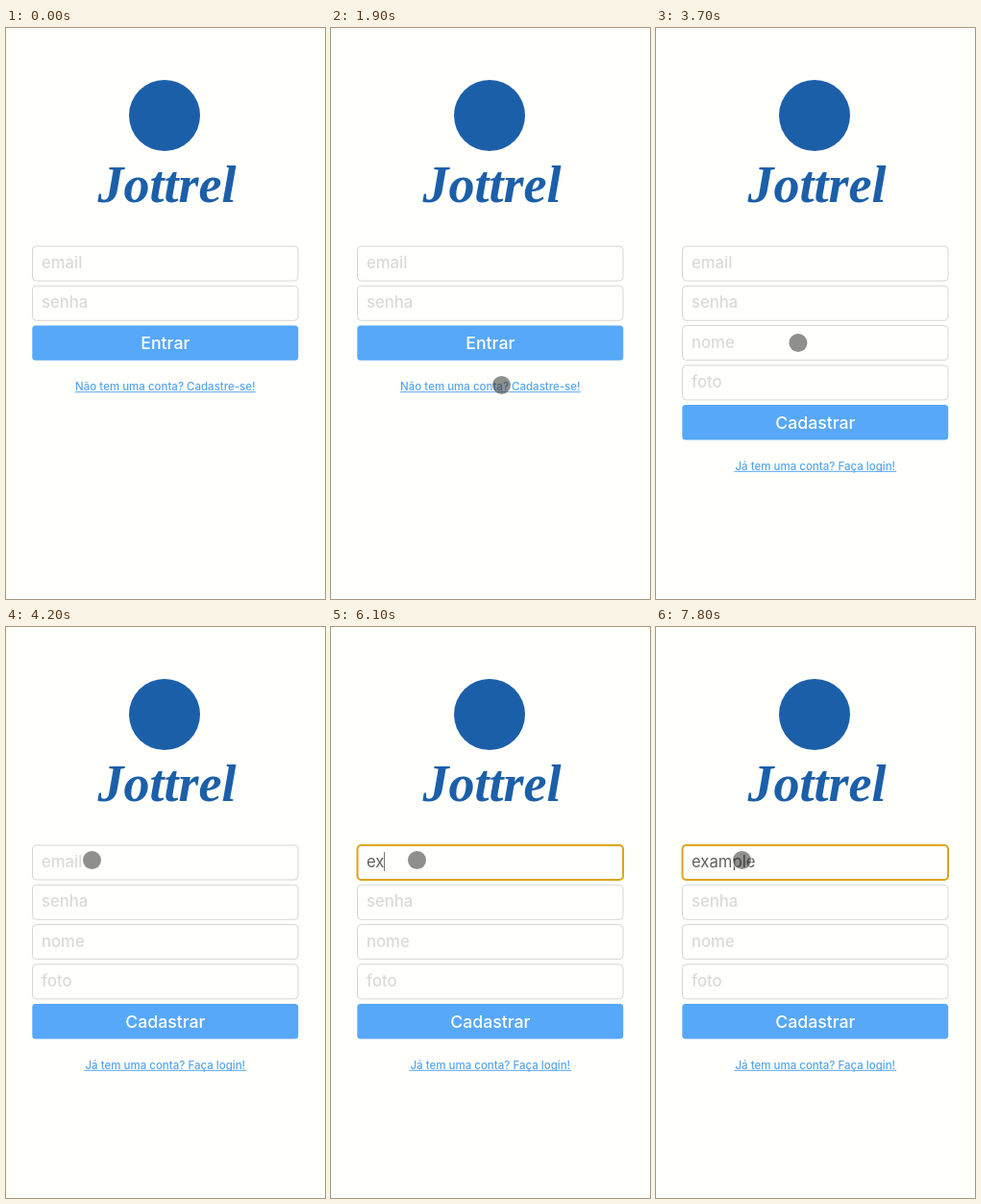
These frames come from a looping animation (332 px wide and 594 px high, 8000 ms). An HTML page:

```html
<!DOCTYPE html>
<html lang="pt-BR">
<head>
<meta charset="utf-8">
<title>Login</title>
<style>
  html, body { margin: 0; width: 100%; height: 100%; overflow: hidden; background: #fffffb; }
  svg { display: block; width: 100%; height: 100%; }
  text { font-family: Inter, "Open Sans", sans-serif; font-size: 16.7px; font-weight: 500; }
  .middle { text-anchor: middle; }
  .brand { font: italic bold 54px "Liberation Serif", serif; fill: #1c5fa9; }
  .field { fill: #fffffd; stroke: #d6d6d6; stroke-width: 1; }
  .focused { stroke: #dda41c; stroke-width: 2; }
  .placeholder { fill: #dadada; }
  .typed { fill: #606060; font-weight: 400; }
  .button { fill: #57a8f8; }
  .label { fill: #fff; font-size: 17.7px; }
  .link { fill: #56a5ee; font-size: 11.5px; }
  .underline { fill: #56a5ee; }
  .cursor { fill: rgba(32, 32, 28, .5); stroke: rgba(255, 255, 255, .5); stroke-width: 2.4; paint-order: stroke; }
</style>
</head>
<body>
<svg viewBox="0 0 332 594">
  <circle cx="165" cy="91" r="37" fill="#1c5fa9"/>
  <text class="brand middle" x="167.5" y="181">Jottrel</text>
  <g id="login"></g>
  <g id="signup"></g>
  <text id="typed" class="typed" x="37" y="250"></text>
  <rect id="caret" y="234" width="1" height="20" fill="#777"/>
  <circle id="cursor" class="cursor" r="9.5"/>
</svg>
<script>
const LOOP = 8000, TICK = 100, BLINK = 500;
const SIGNUP_AT = 2700, FOCUS_AT = 4400;
const KEY_TIMES = [5600, 6100, 6200, 6300, 6500, 6600, 7100];
const WORD = 'example';

// Each move: first changed tick, last changed tick, destination.
const MOVES = [
  [1200, 1200, 277.5, 350.5],
  [1300, 1300, 252, 356.2],
  [1500, 1900, 177.5, 371.5],
  [3600, 4000, 93.5, 246.5],
  [4200, 4200, 89.5, 242.5]
];

const byId = id => document.getElementById(id);
const [login, signup, typed, caret, cursor] =
  ['login', 'signup', 'typed', 'caret', 'cursor'].map(byId);

function formMarkup(fields, action, link, linkWidth) {
  const rowY = i => 227 + i * 41.3;
  const inputs = fields.map((name, i) => `
    <rect class="field" x="27.5" y="${rowY(i)}" width="276.5" height="36" rx="4"/>
    <text class="placeholder" x="37" y="${rowY(i) + 23}">${name}</text>`).join('');
  const y = rowY(fields.length);
  return `${inputs}
    <rect class="button" x="27.3" y="${y - .2}" width="276.9" height="36.4" rx="3.5"/>
    <text class="label middle" x="165.8" y="${y + 24.3}">${action}</text>
    <text class="link middle" x="165.8" y="${y + 67.3}">${link}</text>
    <rect class="underline" x="${165.8 - linkWidth / 2}" y="${y + 68.6}" width="${linkWidth}" height="1"/>`;
}

login.innerHTML = formMarkup(['email', 'senha'], 'Entrar', 'Não tem uma conta? Cadastre-se!', 188);
signup.innerHTML = formMarkup(['email', 'senha', 'nome', 'foto'], 'Cadastrar', 'Já tem uma conta? Faça login!', 169);
const emailField = signup.querySelector('.field');
const emailHint = signup.querySelector('.placeholder');

const show = (element, visible) => element.setAttribute('visibility', visible ? 'visible' : 'hidden');
const smooth = p => p * p * (3 - 2 * p);

function cursorAt(time) {
  let point = null;
  for (const [start, end, x, y] of MOVES) {
    if (time < start) break;
    const [fromX, fromY] = point || [x, y];
    const p = smooth(Math.min(1, (time - start + TICK) / (end - start + TICK)));
    point = [fromX + (x - fromX) * p, fromY + (y - fromY) * p];
  }
  return point;
}

function render(now) {
  const time = Math.floor(now % LOOP / TICK) * TICK;
  const signingUp = time >= SIGNUP_AT;
  const focused = time >= FOCUS_AT;
  const count = KEY_TIMES.filter(key => key <= time).length;

  show(login, !signingUp);
  show(signup, signingUp);
  emailField.classList.toggle('focused', focused);
  emailHint.textContent = count ? '' : 'email';
  typed.textContent = WORD.slice(0, count);

  const lastInput = count ? KEY_TIMES[count - 1] : FOCUS_AT;
  show(caret, focused && Math.floor((time - lastInput) / BLINK) % 2 === 0);
  caret.setAttribute('x', Math.round(37 + (count ? typed.getComputedTextLength() : 0)));

  const point = cursorAt(time);
  show(cursor, point);
  if (point) cursor.setAttribute('transform', `translate(${point})`);
  requestAnimationFrame(render);
}
requestAnimationFrame(render);
</script>
</body>
</html>
```
